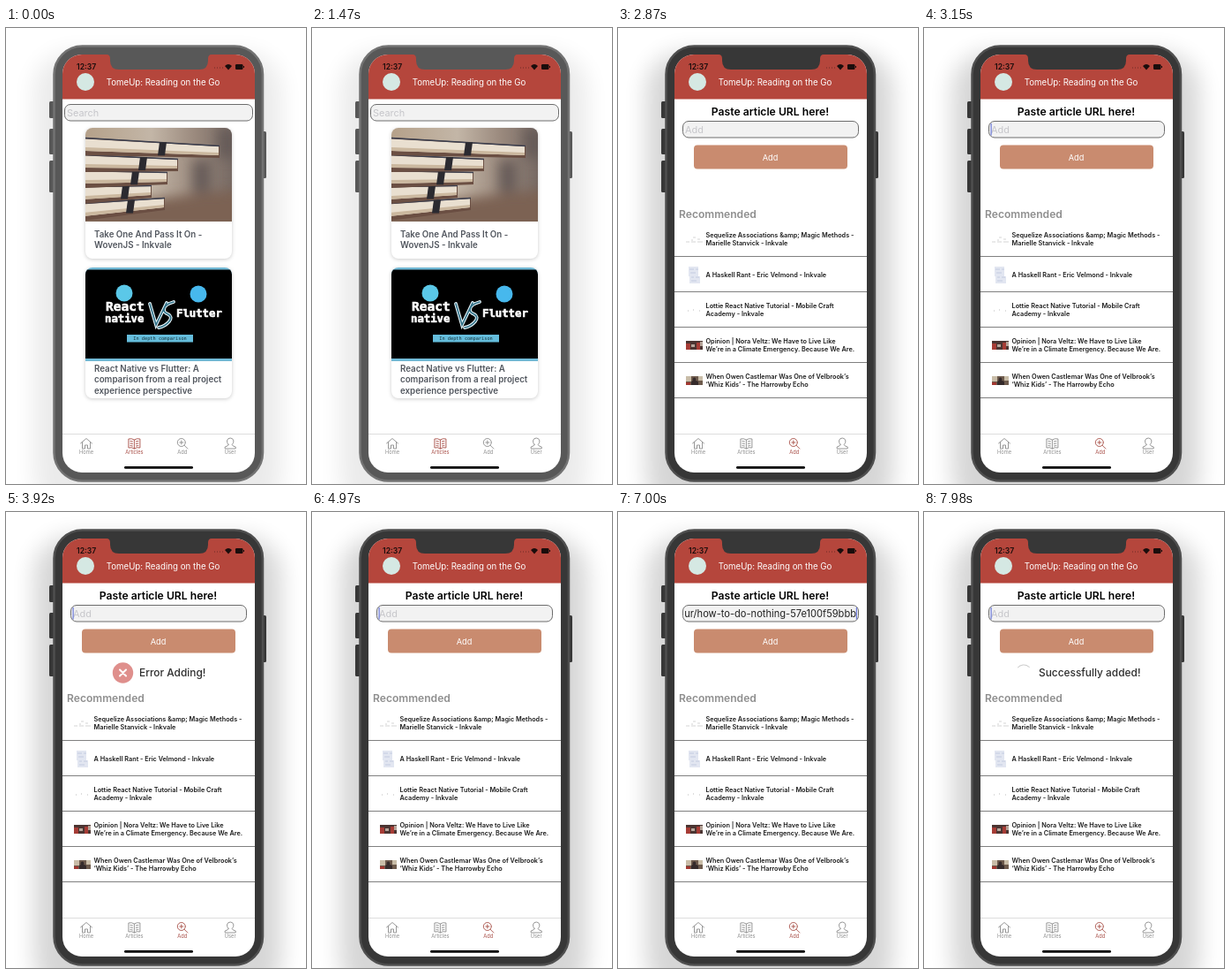
An HTML page that plays this animation: 340 by 516 pixels, repeating every 8 s.

```html
<!DOCTYPE html>
<html lang="en">
<head>
<meta charset="utf-8">
<title>Reading app</title>
<style>
  html, body { margin: 0; width: 100%; height: 100%; overflow: hidden; background: #fff; }
  svg { display: block; width: 340px; height: 516px; font-family: Inter, "Open Sans", sans-serif; }
  svg { --rim: #737373; --body: #585858; --halo: .08; }
  svg.adding { --rim: #4f4f4f; --body: #373737; --halo: .16; }
  .body { fill: var(--body); }
  .line { fill: none; stroke: currentColor; stroke-width: .9; stroke-linejoin: round; stroke-linecap: round; }
  .field { fill: #f2f2f2; stroke: #6c6c6c; }
  .hint { fill: #c6c6ca; font-size: 10.9px; }
  .card { fill: #fff; filter: drop-shadow(0 1px 2px #0003); }
  .caption { fill: #51565e; font-size: 9.75px; font-weight: 600; }
  .row { fill: #1c1c1c; font-size: 7.3px; font-weight: 600; }
  .tab { color: #8d8d8d; font-size: 5.7px; }
  .tab.active { color: #a84e47; }
  .tab text { fill: currentColor; text-anchor: middle; }
  .mono { font: bold 12.3px "DejaVu Sans Mono", monospace; fill: #fff; stroke: #fff; stroke-width: .6; }
  .status { fill: #2e2e2e; font-size: 11.9px; font-weight: 500; }
</style>
</head>
<body>
<svg id="stage" viewBox="0 0 340 516">
  <defs>
    <filter id="soft" x="-30%" y="-20%" width="160%" height="140%"><feGaussianBlur stdDeviation="13"/></filter>
    <filter id="blur"><feGaussianBlur stdDeviation="7"/></filter>
    <linearGradient id="wall">
      <stop offset="0" stop-color="#b5a18a"/><stop offset=".45" stop-color="#c3b6a7"/>
      <stop offset=".75" stop-color="#9a897d"/><stop offset="1" stop-color="#776a64"/>
    </linearGradient>
    <clipPath id="screen"><rect x="64" y="30" width="218" height="473" rx="22"/></clipPath>
    <clipPath id="photo"><path d="M90 219V121a8 8 0 0 1 8-8H248a8 8 0 0 1 8 8V219z"/></clipPath>
    <clipPath id="banner"><path d="M90 377V279a8 8 0 0 1 8-8H248a8 8 0 0 1 8 8V377z"/></clipPath>
    <clipPath id="input"><rect x="75.500" y="106" width="196.500" height="18"/></clipPath>
  </defs>

  <rect x="32" y="28" width="280" height="520" rx="42" filter="url(#soft)" style="opacity:var(--halo)"/>
  <g class="body">
    <rect x="49" y="83" width="7" height="19" rx="1.500"/>
    <rect x="49" y="114" width="7" height="29" rx="1.500"/>
    <rect x="49" y="150" width="7" height="36" rx="1.500"/>
    <rect x="289" y="117" width="6" height="53" rx="1.500"/>
    <rect x="54.500" y="20.500" width="236.500" height="492" rx="32" style="stroke:var(--rim);stroke-width:2.500"/>
  </g>

  <g clip-path="url(#screen)">
    <path fill="#fff" d="M64 30H282V503H64z"/>
    <path fill="#b5463c" d="M64 30H282V80.500H64z"/>
    <path class="body" d="M114 30q4 0 4 5v2q0 10 10 10h91q10 0 10-10v-2q0-5 4-5z"/>
    <text x="80" y="47" font-size="8.600" font-weight="600" fill="#1a0d0c">12:37</text>
    <circle cx="90" cy="61" r="10" fill="#d5e8e3"/>
    <text x="113.700" y="65" font-size="9.700" fill="#fff">TomeUp: Reading on the Go</text>
    <g fill="#1a0d0c">
      <path d="M236 45h1m2 0h1m2 0h1m2 0h1" stroke="#6d2a24"/>
      <path d="M248 43q4-4 8 0l-4 4.500z"/>
      <rect x="260" y="41" width="8.500" height="6" rx="1.300"/><path d="M269 43h1v2h-1z"/>
    </g>

    <g id="articles">
      <rect class="field" x="66.500" y="86.500" width="213" height="18.500" rx="6.500"/>
      <text class="hint" x="69" y="100">Search</text>

      <rect class="card" x="90" y="113" width="166" height="148" rx="8"/>
      <g id="books" clip-path="url(#photo)">
        <path fill="url(#wall)" d="M90 113H256V219H90z"/>
        <g filter="url(#blur)">
          <path fill="#7b6252" d="M80 203L270 182V230H80z"/>
          <path fill="#665b58" d="M212 150h20v36h-20zM240 113h26v34h-26z"/>
        </g>
      </g>
      <text class="caption" x="100" y="237">Take One And Pass It On -</text>
      <text class="caption" x="100" y="249.300">WovenJS - Inkvale</text>

      <rect class="card" x="90" y="271" width="166" height="148" rx="8"/>
      <g clip-path="url(#banner)">
        <path fill="#70b9d6" d="M90 271H256V377H90z"/>
        <path d="M90 273.500H256V374H90z"/>
        <circle cx="134" cy="300" r="9.500" fill="#5bc8e8"/>
        <circle cx="218" cy="301" r="9.500" fill="#47b8ed"/>
        <text class="mono" x="113" y="320" style="font-size:14.500px">React</text>
        <text class="mono" x="112" y="333">native</text>
        <text class="mono" x="193" y="327">Flutter</text>
        <g fill="none" stroke-linecap="round">
          <path id="versus" d="M163 312l7 24 12-25M190 310q-11 3-11 9 0 3 5 5 5 3 1 8-5 6-12 7" stroke="#e4f3f8" stroke-width="3.800"/>
          <path d="M163 312l7 24 12-25M190 310q-11 3-11 9 0 3 5 5 5 3 1 8-5 6-12 7" stroke="#2f6f86" stroke-width="1.600"/>
        </g>
        <path fill="#65bddc" d="M137 347h75v8.500h-75z"/>
        <text x="174.500" y="353.200" text-anchor="middle" class="mono" style="font-size:5.300px;font-weight:400;fill:#14343e;stroke:none">In depth comparison</text>
      </g>
      <text class="caption" x="100" y="388.500">React Native vs Flutter: A</text>
      <text class="caption" x="100" y="401">comparison from a real project</text>
      <text class="caption" x="100" y="413.500">experience perspective</text>
    </g>

    <g id="add">
      <text x="172.500" y="99.300" text-anchor="middle" font-size="12.200" font-weight="600">Paste article URL here!</text>
      <rect class="field" x="73.500" y="105.500" width="199" height="18.500" rx="6.500"/>
      <text id="hint" class="hint" x="76" y="119">Add</text>
      <g clip-path="url(#input)">
        <text id="pasted" x="270" y="119" text-anchor="end" font-size="11.100" fill="#222">aur/how-to-do-nothing-57e100f59bbb</text>
      </g>
      <rect id="caret" y="108" width="1.200" height="13.500" fill="#6a78d8"/>
      <rect x="86" y="132.500" width="174" height="27" rx="4" fill="#c98b6f"/>
      <text x="172.500" y="149.500" text-anchor="middle" font-size="9.200" fill="#fff">Add</text>
      <g id="error">
        <g id="cross">
          <circle r="11.700" fill="#df8f8c"/>
          <path d="M-3.500-3.500l7 7m0-7l-7 7" stroke="#fff" stroke-width="2" stroke-linecap="round"/>
        </g>
        <text class="status" x="151" y="186">Error Adding!</text>
      </g>
      <g id="success">
        <circle id="arc" r="9" transform="translate(113 182) rotate(-140)" pathLength="100" fill="none" stroke="#ccc"/>
        <text class="status" x="130" y="186">Successfully added!</text>
      </g>
      <text x="69" y="215" font-size="12.100" font-weight="600" fill="#8e8e8e">Recommended</text>
      <g id="rows"></g>
      <path d="M77 242h4m2 0h5m2 0h6M85 237h3m-5 3h2m5-1h3" stroke="#c9c9c9" stroke-width=".8"/>
      <path d="M80 270h11v11h2v8H81v-8h-1z" fill="#e2e6f1"/>
      <path d="M81 273h5m2 0h3m-9 4h6m-5 5h3m2 0h4m-9 4h6" stroke="#c3cbe0"/>
      <path d="M79 320h1m5-1h1m6 1h1" stroke="#bbb"/>
      <path d="M77 354h19v10H77z" fill="#4b3532"/>
      <path d="M77 357h5v7h-5zM89 356h4v8h-4z" fill="#a63c36"/>
      <path d="M83 358h4v3h-4zM93 355h3v5h-3z" fill="#b5a59a"/>
      <path d="M77 394h19v10H77z" fill="#6e5b4d"/>
      <path d="M77 394h6v6h-6zM91 394h5v5h-5z" fill="#c9bda8"/>
      <path d="M83 404v-3q0-2 2-2a2 2 0 1 1 3 0q3 0 3 2v3z" fill="#352b2b"/>
      <path d="M77 401h5v3h-5z" fill="#a23831"/>
    </g>

    <path d="M64 459.500H282" stroke="#ddd"/>
    <g id="tabs"></g>
    <rect x="134" y="496" width="78" height="2.800" rx="1.400"/>
  </g>
</svg>

<script>
const $ = id => document.getElementById(id);
const LOOP = 8000;
const AT = { addTab: 1575, focus: 2905, error: 3465, errorEnd: 4935, paste: 5505, success: 7770 };

// Stacked books, lowest first: left top, right top, right edge, strap position
$('books').insertAdjacentHTML('beforeend', [
  [198, 192, 180, 141],
  [179, 178, 165, 135],
  [161, 163, 183, 146],
  [143, 148, 195, 155],
  [124, 133, 242, 177]
].map(([left, right, edge, strap]) => {
  const top = left + (right - left) / (edge - 90) * (strap - 90);
  return `<path fill="#6b4f43" d="M88 ${left}L${edge} ${right}v14L88 ${left + 20}z"/>
    <path fill="#e9dfd0" d="M88 ${left + 1.5}L${edge - 1} ${right + 1}v10L88 ${left + 15}z"/>
    <path fill="#cbb89f" d="M88 ${left + 11}L${edge - 1} ${right + 8}v3L88 ${left + 15}z"/>
    <path stroke="#3b3f4f" stroke-width="1.500" d="M88 ${left + .5}L${edge} ${right + .5}"/>
    <path fill="#2b2a30" d="M${strap - 3} ${top}h8l-2 15h-8z"/>`;
}).join(''));

$('rows').innerHTML = [
  ['Sequelize Associations &amp;amp; Magic Methods -', 'Marielle Stanvick - Inkvale'],
  ['A Haskell Rant - Eric Velmond - Inkvale'],
  ['Lottie React Native Tutorial - Mobile Craft', 'Academy - Inkvale'],
  ['Opinion | Nora Veltz: We Have to Live Like', 'We’re in a Climate Emergency. Because We Are.'],
  ['When Owen Castlemar Was One of Velbrook’s', '‘Whiz Kids’ - The Harrowby Echo']
].map((lines, i) => {
  const y = 237.3 + 40 * i + (lines.length === 1 ? 4.5 : 0);
  return lines.map((line, n) => `<text class="row" x="99.500" y="${y + 9 * n}">${line}</text>`).join('') +
    `<path d="M64 ${258.5 + 40 * i}H282" stroke="#808080"/>`;
}).join('');

$('tabs').innerHTML = [
  ['Home', 'M-6.500 0L0-5.500 6.500 0M-4.500-1.500V6h3V2h3v4h3v-7.500'],
  ['Articles', 'M0-4q-3-2-6.500-1V5Q-3 4 0 6 3 4 6.500 5V-5Q3-6 0-4V6M-4.500-2.500l2.500.5m-2.500 2l2.500.5m-2.500 2l2.500.5M4.500-2.500L2-2m2.500 2L2 .5m2.500 2L2 3'],
  ['Add', 'M3.500-1a4.500 4.500 0 1 1-9 0a4.500 4.500 0 1 1 9 0M2.300 2.300L6 6M-3-1h4m-2-2v4'],
  ['User', 'M-2 1.500q-2-2-1.700-4.500 .7-3 3.700-3t3.700 3Q4-.5 2 1.500q0 1.500 4 2.500V6H-6V4q4-1 4-2.500']
].map(([label, icon], i) =>
  `<g class="tab" transform="translate(${91 + 54.4 * i} 470)">
    <path class="line" d="${icon}"/><text y="12">${label}</text></g>`).join('');

const tabs = document.querySelectorAll('.tab');
const show = (id, on) => { $(id).style.display = on ? '' : 'none'; };
const progress = (t, start, length) => Math.min(1, Math.max(0, (t - start) / length));

function draw(t) {
  const adding = t >= AT.addTab;
  const pasted = t >= AT.paste && t < AT.success;
  const failed = t >= AT.error && t < AT.errorEnd;

  $('stage').classList.toggle('adding', adding);
  tabs.forEach((tab, i) => tab.classList.toggle('active', i === (adding ? 2 : 1)));
  show('articles', !adding);
  show('add', adding);
  show('hint', !pasted);
  show('pasted', pasted);
  show('error', failed);
  show('success', t >= AT.success);

  const blinkStart = [AT.success, AT.paste, AT.focus].find(start => t >= start);
  show('caret', blinkStart && (t - blinkStart) % 1000 < 500);
  $('caret').setAttribute('x', pasted ? 269.8 : 75.5);

  const grow = 1 - (1 - progress(t, AT.error, 300)) ** 3;
  $('cross').setAttribute('transform', `translate(132.5 182) scale(${grow})`);
  $('arc').setAttribute('stroke-dasharray', `${27 * progress(t, AT.success, 210)} 100`);
}

const start = performance.now();
function tick() {
  draw((performance.now() - start) % LOOP);
  requestAnimationFrame(tick);
}
tick();
</script>
</body>
</html>
```
